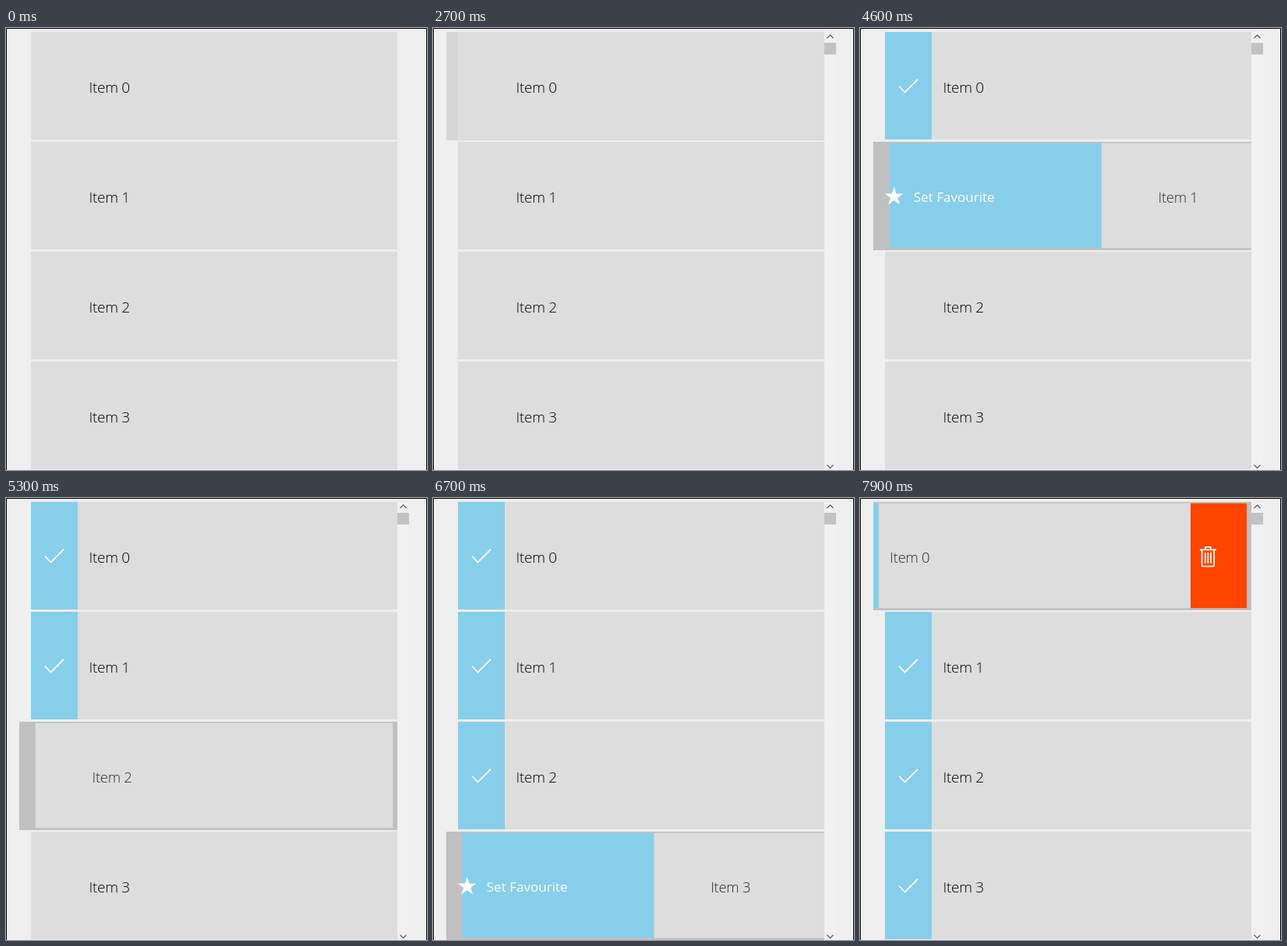
Write an HTML page that moves like this. It is 540 by 567 pixels and loops after 8 s.

```html
<!DOCTYPE html>
<html lang="en">
<head>
<meta charset="utf-8">
<title>Swipe list</title>
<style>
  html, body { margin: 0; width: 100%; height: 100%; overflow: hidden; background: #efefef; }
  svg { display: block; width: 540px; height: 567px; }
  text { font-family: "Open Sans", "Noto Sans", sans-serif; }
  .label { font-size: 19px; font-weight: 300; letter-spacing: -.3px; }
  .cmd { font-size: 17.5px; fill: #fff; }
  .line { fill: none; stroke: #fff; stroke-width: 1.8; }
</style>
</head>
<body>
<svg id="stage" viewBox="0 0 540 567">
  <defs><clipPath id="row"><rect x="17" y="0" width="485" height="139"/></clipPath></defs>
  <rect width="540" height="567" fill="#efefef"/>
  <g id="rows"></g>
  <g id="bar">
    <rect x="502" y="5" width="15" height="562" fill="#f1f1f1"/>
    <rect x="502" y="19" width="15" height="15" fill="#c2c2c2"/>
    <path d="M505.5 13l4-4 4 4M505.5 560.5l4 4 4-4" fill="none" stroke="#555" stroke-width="1.1"/>
  </g>
  <path d="M.5 567V.5H539.5V567" fill="none" stroke="#000"/>
</svg>
<script>
const LOOP = 8000, STEP = 100, PRESSED = 0.975, WIDTH = 470, COMMAND = 214.6;

// [time, hovered row], -1 for none
const hovers = [[0, -1], [400, 0], [1200, 1], [1800, 2], [2100, -1], [2200, 3],
  [2500, 2], [2600, 1], [2700, 0], [3900, 1], [5000, 2], [6100, 3], [7200, -1], [7500, 0]];

// drag distance at each step; up = release step, grow = step where scaling back starts
const swipes = [
  { row: 0, start: 3200, up: 3, grow: 4, drag: [0, 90, 230, 150, 0] },
  { row: 1, start: 4300, up: 4, grow: 5, drag: [0, 40, 170, 279, 220, 60, 0] },
  { row: 2, start: 5300, up: 5, grow: 7, drag: [0, 50, 150, 250, 285, 190, 45, 0] },
  { row: 3, start: 6500, up: 4, grow: 5, drag: [0, 110, 252, 285, 190, 45, 0] },
  { row: 0, start: 7800, up: 9, grow: 9, drag: [-20, -74] }
];

const star = Array.from({ length: 10 }, (_, i) => {
  const r = i % 2 ? 5 : 12.8, a = i * Math.PI / 5 - Math.PI / 2;
  return (38 + r * Math.cos(a)).toFixed(2) + "," + (70.5 + r * Math.sin(a)).toFixed(2);
}).join(" ");

const rowMarkup = i => `
  <g transform="translate(0 ${5 + i * 141})" clip-path="url(#row)">
    <rect class="back" x="17" width="485" height="139"/>
    <g class="tilt">
      <g class="fav">
        <rect class="blue" x="32" height="138" fill="#87ceeb"/>
        <g class="favIn"><polygon points="${star}" fill="#fff"/><text class="cmd" x="63.7" y="77">Set Favourite</text></g>
      </g>
      <rect class="red" height="138" fill="#ff4500"/>
      <g class="body">
        <rect x="32" width="${WIDTH}" height="138" fill="#ddd"/>
        <g class="check"><rect x="32" width="60" height="138" fill="#87ceeb"/><path class="line" d="M50 69.5l7.5 8 16.5-16.5"/></g>
        <text class="label" x="106.5" y="78">Item ${i}</text>
      </g>
      <path class="bin line" d="M-10.8 -8.8H10.8M-3.5 -9V-12.3H3.5V-9M-8 -8.5V11.5Q-8 13 -6.5 13H6.5Q8 13 8 11.5V-8.5M-3.7 -5V9M0 -5V9M3.7 -5V9"/>
    </g>
  </g>`;

const rowsBox = document.getElementById("rows"), bar = document.getElementById("bar");
rowsBox.innerHTML = [0, 1, 2, 3].map(rowMarkup).join("");
const rows = [...rowsBox.children].map(g => {
  const part = {};
  for (const name of ["back", "tilt", "fav", "blue", "favIn", "red", "body", "check", "label", "bin"])
    part[name] = g.querySelector("." + name);
  return part;
});

const set = (el, attrs) => { for (const k in attrs) el.setAttribute(k, attrs[k]); };
const show = (el, on) => el.setAttribute("visibility", on ? "visible" : "hidden");

function pose(row, t) {
  const p = { dx: 0, scale: 1, pressed: false, released: false, checked: false };
  for (const s of swipes) {
    if (s.row !== row || t < s.start) continue;
    const n = Math.round((t - s.start) / STEP);
    p.pressed = n < s.up;
    p.released = !p.pressed;
    p.dx = n < s.drag.length ? s.drag[n] : 0;
    p.scale = n <= s.grow ? PRESSED : Math.min(1, PRESSED + (n - s.grow) * 0.0125);
    p.checked = p.checked || p.released;
  }
  return p;
}

function draw(t) {
  const hover = hovers.filter(h => h[0] <= t).pop()[1];
  set(bar, { opacity: t < 400 ? 0 : t < 500 ? 0.5 : 1 });
  rows.forEach((r, i) => {
    const p = pose(i, t), right = Math.max(0, p.dx), left = Math.max(0, -p.dx);
    const edge = 32 + WIDTH - left, inset = p.released ? 1.3 : 0;
    show(r.back, hover === i);
    set(r.back, { fill: p.pressed ? "#c0c0c0" : "#d6d6d6" });
    set(r.tilt, { transform: `translate(267 69) scale(${p.scale}) translate(-267 -69)` });
    set(r.body, { transform: `translate(${p.dx} 0)` });
    set(r.label, { fill: p.scale < 1 ? "#2a2a2a" : "#000" });
    show(r.check, p.checked);
    show(r.fav, right > 0);
    set(r.blue, { width: right, y: inset, height: 138 - 2 * inset });
    set(r.favIn, { transform: `translate(${Math.min(0, right - COMMAND)} 0)` });
    show(r.red, left > 0);
    set(r.red, { x: edge, width: left });
    show(r.bin, left > 0);
    set(r.bin, { transform: `translate(${edge + 23} 70)` });
  });
}

const origin = performance.now();
function tick() {
  const t = (performance.now() - origin) % LOOP;
  draw(Math.floor(t / STEP) * STEP);
  requestAnimationFrame(tick);
}
tick();
</script>
</body>
</html>
```
